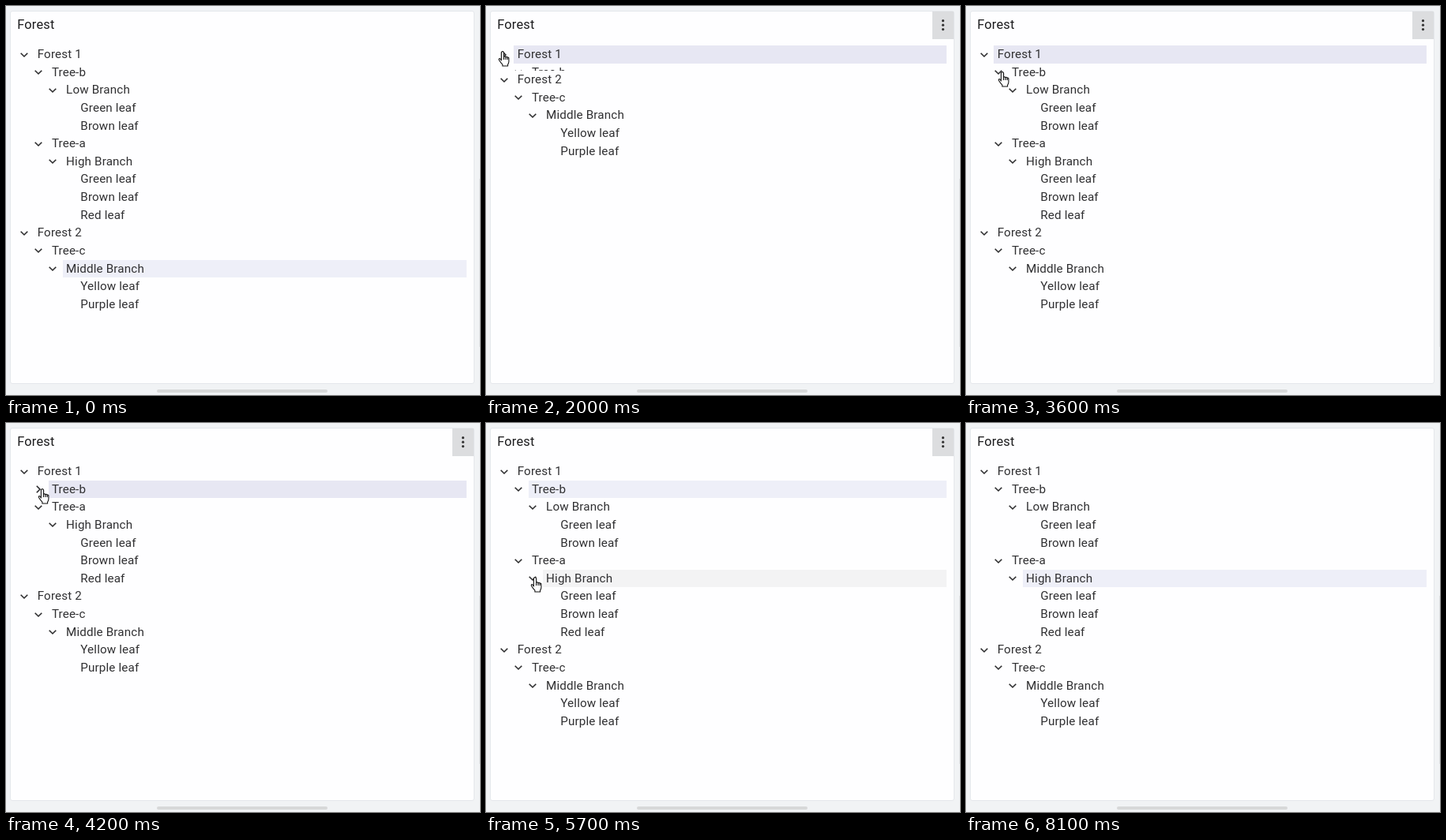
These frames come from a looping animation (600x493 px, 8200 ms). An HTML page:

```html
<!DOCTYPE html>
<html lang="en">
<head>
<meta charset="utf-8">
<title>Forest</title>
<style>
  html, body { margin: 0; width: 100%; height: 100%; overflow: hidden; background: #f1f3f5; }
  body { position: relative; font: 15.2px/23.4px Roboto, sans-serif; letter-spacing: .15px; color: #303032; }
  body > *, .row svg { position: absolute; }
  #card { box-sizing: border-box; left: 5px; top: 6px; width: 588px; height: 473px;
    background: #fefeff; border: 1px solid #e4e7eb; border-radius: 3px; }
  #title { left: 14.2px; top: 12.4px; font-size: 16.4px; letter-spacing: .2px; color: #1c1c1e; }
  #menu { left: 565px; top: 7px; width: 27px; height: 34.5px; background: #dcdddf; }
  #thumb { left: 191px; top: 486px; width: 216px; height: 4px; border-radius: 2px; background: #d7d8d9; }
  #edge { left: 599px; top: 219px; width: 1px; height: 213px; background: #e0e2e4; }
  #tree { left: 0; top: 50px; width: 582.5px; }
  .row { position: relative; height: 22.64px; padding-left: 4.3px; white-space: nowrap; }
  .row svg { left: -18.6px; top: 5.5px; fill: none; stroke: #2a2a2c; stroke-width: 1.6; }
  .kids { overflow: hidden; }
  #hand, #arrow { left: 0; top: 0; overflow: visible; }
</style>
</head>
<body>
<div id="card"></div>
<div id="title">Forest</div>
<svg id="menu" viewBox="0 0 27 34.5" fill="#333">
  <circle cx="13.5" cy="11.7" r="1.6"/><circle cx="13.5" cy="17.2" r="1.6"/><circle cx="13.5" cy="22.6" r="1.6"/>
</svg>
<div id="tree"></div>
<div id="thumb"></div>
<div id="edge"></div>
<svg id="hand" width="15" height="20" fill="#fff" stroke="#111" stroke-width="1.1" stroke-linejoin="round">
  <path d="M4 12V2.2a1.6 1.6 0 0 1 3.2 0V7.5a1.3 1.3 0 0 1 2.4.3a1.2 1.2 0 0 1 2.2.6a1 1 0 0 1 1.7.8V13.5Q13.4 15.5 12.2 17V19H5.5V17.2Q3 14.5 1 11.2Q.6 9.6 2 9.6Q3 10 4 12z"/>
  <path d="M7.2 7.5V11M9.6 8V11M11.8 8.5V11" fill="none"/>
</svg>
<svg id="arrow" width="11" height="17" fill="#111" stroke="#fff" stroke-width=".8">
  <path d="M.6 .6V14L3.8 11.2L6 16L8.2 15L6.1 10.6H10z"/>
</svg>
<script>
const ROW = 22.64, INDENT = 18.2, LOOP = 8200, FOLD = 300;
const LIGHT = '#eeeff8', STRONG = '#e7e7f3', HOVER = '#f3f3f4';
const $ = id => document.getElementById(id);

// Each line: depth and label
const lines = ['0Forest 1', '1Tree-b', '2Low Branch', '3Green leaf', '3Brown leaf',
  '1Tree-a', '2High Branch', '3Green leaf', '3Brown leaf', '3Red leaf',
  '0Forest 2', '1Tree-c', '2Middle Branch', '3Yellow leaf', '3Purple leaf'];
const nodes = {};
const boxes = [$('tree')];
for (const line of lines) {
  const depth = +line[0], name = line.slice(1), leaf = depth === 3;
  const row = document.createElement('div'), kids = document.createElement('div');
  row.className = 'row';
  kids.className = 'kids';
  row.style.marginLeft = 35.4 + depth * INDENT + 'px';
  row.innerHTML = (leaf ? '' : '<svg width="12" height="12"><path d="M1.7 3.8L6 8L10.3 3.8"/></svg>') + name;
  boxes[depth].append(row, kids);
  boxes[depth + 1] = kids;
  if (!leaf) nodes[name] = { row, kids, icon: row.firstChild };
}

// Start times of collapsing and expanding
const folds = [
  { name: 'Forest 1', close: 1780, open: 2766 },
  { name: 'Tree-b', close: 3760, open: 4370 },
  { name: 'High Branch', close: 5760, open: 6270 }
];

// From this time on, the named row has this background
const marks = [
  [0, 'Middle Branch', LIGHT], [1800, 'Forest 1', STRONG], [3700, 'Tree-b', STRONG],
  [5600, 'Tree-b', LIGHT], [5800, 'High Branch', STRONG], [8000, 'High Branch', LIGHT]
];

// Pointer tip: time, x, y
const path = [[500, 58, 341], [1300, 21, 61], [1400, 21, 58], [3200, 21, 58], [3600, 46, 84],
  [4800, 46, 84], [5500, 62, 196], [6300, 62, 196], [6600, 54, 231], [7100, 49, 325], [7200, 4, 338], [7300, 4, 338]];
const handSpans = [[1400, 3300], [3500, 4900], [5400, 6400]];

const within = (t, a, b) => t >= a && t < b;

// cubic-bezier(.4, 0, .2, 1)
function ease(x) {
  if (x <= 0 || x >= 1) return x <= 0 ? 0 : 1;
  let lo = 0, hi = 1, u;
  for (let i = 0; i < 16; i++) {
    u = (lo + hi) / 2;
    const v = 1 - u;
    if (1.2 * u * v * v + .6 * u * u * v + u * u * u < x) lo = u; else hi = u;
  }
  return u * u * (3 - 2 * u);
}

function pointer(t) {
  const i = path.findIndex(p => p[0] > t);
  if (i < 1) return null;
  const [t0, x0, y0] = path[i - 1], [t1, x1, y1] = path[i];
  const k = (t - t0) / (t1 - t0), s = k * k * (3 - 2 * k);
  return [x0 + (x1 - x0) * s, y0 + (y1 - y0) * s];
}

function place(el, show, x, y) {
  el.style.display = show ? '' : 'none';
  if (show) el.style.transform = `translate(${x}px, ${y}px)`;
}

function draw(t) {
  $('menu').style.display = within(t, 500, 8000) ? '' : 'none';

  for (const { name, close, open } of folds) {
    const { kids, icon } = nodes[name];
    const size = 1 - ease((t - close) / FOLD) + ease((t - open) / FOLD);
    kids.style.height = size >= 1 ? 'auto' : size * kids.querySelectorAll('.row').length * ROW + 'px';
    icon.style.transform = within(t, close, open) ? 'rotate(-90deg)' : '';
  }

  for (const name in nodes) nodes[name].row.style.background = '';
  if (within(t, 5400, 5800)) nodes['High Branch'].row.style.background = HOVER;
  const [, name, color] = marks.filter(m => m[0] <= t).pop();
  nodes[name].row.style.background = color;

  const tip = pointer(t), [x, y] = tip || [0, 0];
  const hand = handSpans.some(([a, b]) => within(t, a, b));
  place($('hand'), tip && hand, x - 5.6, y - 1);
  place($('arrow'), tip && !hand, x - .6, y - .6);
}

const start = performance.now();
function frame() {
  const t = (performance.now() - start) % LOOP;
  draw(Math.floor(t / 100) * 100);
  requestAnimationFrame(frame);
}
frame();
</script>
</body>
</html>
```
